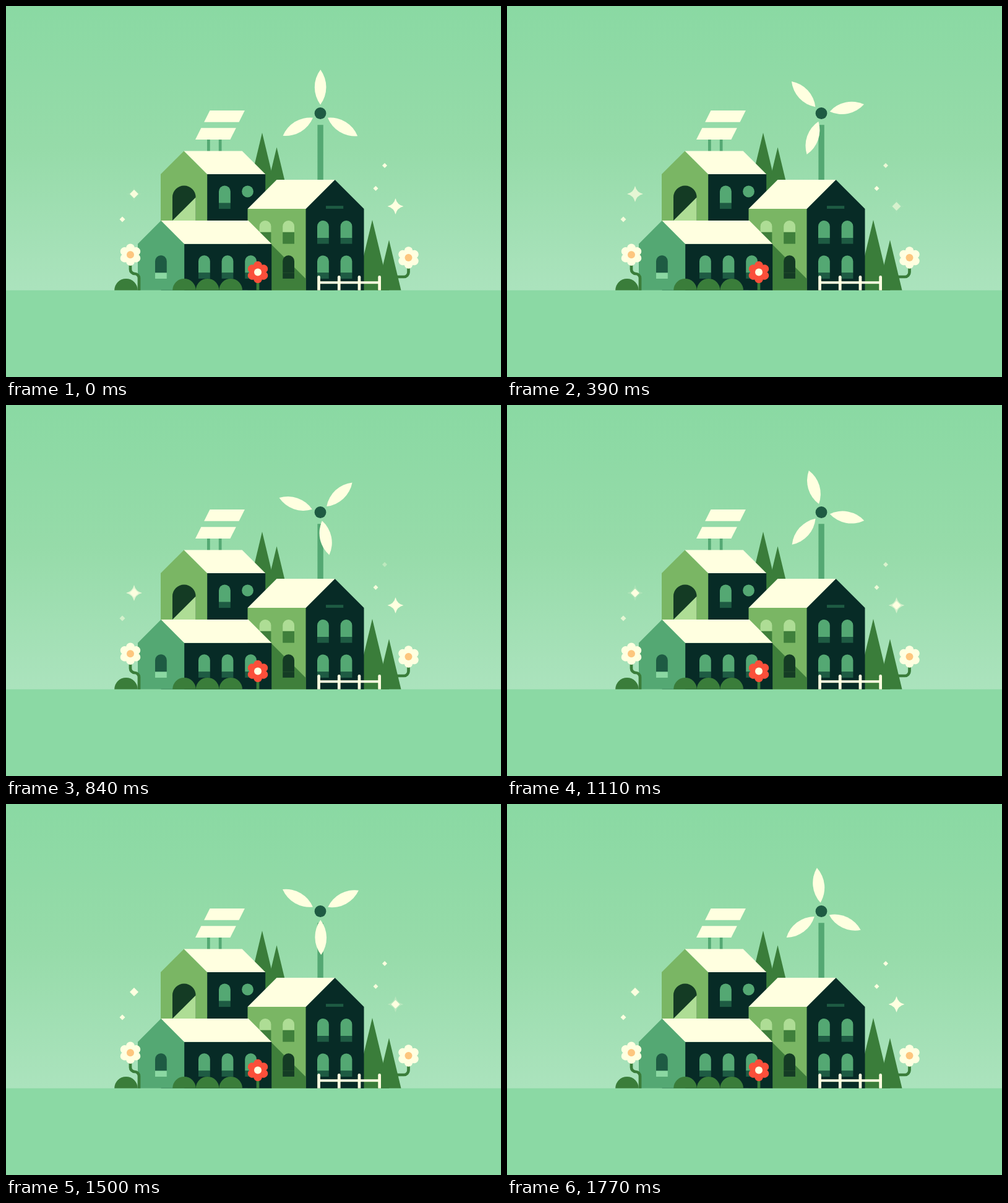
Write an HTML page that moves like this. It is 800x600 px and loops after 1800 ms.

```html
<!DOCTYPE html>
<html lang="en">
<head>
<meta charset="utf-8">
<title>Green village</title>
<style>
html, body { margin: 0; height: 100%; overflow: hidden; background: #8bd9a4 }
svg { display: block; width: 100%; height: 100% }
</style>
</head>
<body>
<svg id="stage" viewBox="0 0 800 600"></svg>
<script>
const LOOP = 1800, GROUND = 459.7;
const U = 4.7; // grid unit of the drawing
const cream = '#ffffe0', night = '#072b26', pine = '#1e5b43', mint = '#54a873', leaf = '#3a7d3a',
  lime = '#7ab664', pale = '#aedd95', moss = '#3f7f3b', cave = '#143b24';

const stage = document.getElementById('stage');
const repeat = (n, make) => Array.from({ length: n }, (_, i) => make(i)).join('');
const shape = (fill, d) => `<path fill="${fill}" d="${d}"/>`;
const box = (fill, x, y, w, h) => shape(fill, `M${x} ${y}h${w}v${h}h${-w}z`);
const line = (color, width, d) => `<path fill="none" stroke="${color}" stroke-width="${width}" d="${d}"/>`;
const dot = (fill, x, y, r) => `<circle fill="${fill}" cx="${x}" cy="${y}" r="${r}"/>`;

// Starts at the outer gable corner; negative sizes build to the left
const house = (x, eave, half, length, base, gable, wall) => {
  const peak = x + half, inner = peak + half, top = eave - Math.abs(half);
  return box(wall, peak, eave, half + length, base - eave) +
    shape(gable, `M${x} ${base}V${eave}L${peak} ${top}L${inner} ${eave}V${base}z`) +
    shape(cream, `M${peak} ${top}h${length}L${inner + length} ${eave}H${inner}z`);
};

// Arched window of 4 by 8 units with a separate lower pane
const arch = (x, y, top = mint, low = pine, glass = 6 * U) =>
  shape(top, `M${x} ${y + glass}V${y + 2 * U}a${2 * U} ${2 * U} 0 0 1 ${4 * U} 0V${y + glass}z`) +
  box(low, x, y + glass, 4 * U, 8 * U - glass);
const arches = (n, x, y, ...look) => repeat(n, i => arch(x + i * 8 * U, y, ...look));

const tree = (x, top, base) => {
  const half = .24 * (base - top);
  return shape(leaf, `M${x} ${top}l${half} ${base - top}h${-2 * half}z`);
};
const bush = x => shape(leaf, `M${x - 4 * U} ${GROUND}a${4 * U} ${4 * U} 0 0 1 ${8 * U} 0z`);
const flower = (x, y, petal, heart) =>
  `<g transform="translate(${x} ${y})">` + dot(petal, 0, 0, 10) +
  repeat(6, i => `<g transform="rotate(${i * 60})">${dot(petal, 0, -10.8, 6.9)}</g>`) +
  dot(heart, 0, 0, 6) + '</g>';

const sky = `
  <linearGradient id="sky" x2="0" y2="1">
    <stop stop-color="#8ad9a3"/><stop offset=".5" stop-color="#96dba9"/><stop offset="1" stop-color="#abe3bd"/>
  </linearGradient>` +
  box('url(#sky)', 0, 0, 800, 460) + box('#8bd9a4', 0, GROUND, 800, 141);

// The two lower blades sit slightly more than a third of a turn from the upper one
const blade = angle => `<g transform="rotate(${angle})">` +
  shape(cream, 'M0-70.5A47.5 47.5 0 0 1 0-14A47.5 47.5 0 0 1 0-70.5z') + '</g>';
const turbine = box(mint, 503.4, 192.2, 2 * U, 92) +
  `<g transform="translate(508 173.5)"><g id="rotor">${[0, 121.2, 238.8].map(blade).join('')}</g>` +
  dot(pine, 0, 0, 2 * U) + '</g>';

const panels = repeat(2, i =>
  box(mint, 325 + i * 4 * U, 215, U, 22) +
  shape(cream, `M${329.5 - i * 3 * U} ${169 + i * 6 * U}h${12 * U}l${-2 * U} ${4 * U}h${-12 * U}z`));

const upperHouse = house(250, 272, 8 * U, 20 * U, 350, lime, night) +
  shape(cave, `M269 350V309.3a${4 * U} ${4 * U} 0 0 1 ${8 * U} 0V350z`) +
  shape(pale, 'M306.6 309.5V347.1H269z') +
  arch(344, 290.5) + dot(mint, 390.5, 300, 2 * U);

const rightHouse = house(578.5, 328, -10 * U, -20 * U, GROUND, night, lime) +
  shape(moss, `M428 384.7l56.5 56.5V${GROUND}H428z`) +
  arches(2, 409.6, 347, pale, moss, 4 * U) + arch(447.2, 403.3, cave, cave) +
  repeat(2, i => arches(2, 503, 347 + i * 12 * U)) +
  box(pine, 517, 323.2, 6 * U, U);

const frontHouse = house(213, 384.7, 8 * U, 30 * U, GROUND, mint, night) +
  arch(241, 403.3, pine, '#8bd8a2') + arches(3, 311, 403.3);

const stems = line(leaf, U, `M201 418v8a7 7 0 0 0 7 7a7 7 0 0 1 7 7V${GROUND}M407 445V${GROUND}M630 438h13a7.5 7.5 0 0 0 7.5-7.5v-8`);
const fence = line(cream, 4, 'M505.5 447.3h98') +
  repeat(4, i => shape(cream, `M${503.2 + i * 32.7} ${GROUND}V438.3a2.35 2.35 0 0 1 ${U} 0V${GROUND}z`));
const garden = bush(194) + repeat(3, i => bush(288 + i * 8 * U)) + stems +
  flower(201, 402.3, cream, '#fdc67e') + flower(650.5, 407, cream, '#fdc67e') +
  flower(407, 430.5, '#fb4f3a', cream) + fence;

// Sparkles: a pulse has the given peak, beats per loop and sharpness
const pulse = (p, peak, beats, sharp) => Math.cos(Math.PI * beats * (p - peak)) ** (2 * sharp);
const diamond = r => `M0-${r}L${r} 0L0 ${r}L-${r} 0z`;
const star = 'M0-13Q2.5-2.5 13 0Q2.5 2.5 0 13Q-2.5 2.5-13 0Q-2.5-2.5 0-13z';
const dim = (peak, depth, sharp) => p => 1 - depth * pulse(p, peak, 1, sharp);
const sparkles = [
  [207, 304, diamond(7), dim(.25, 1, 4)],
  [207, 304, star, p => pulse(p, .34, 1, 2)],
  [629.5, 324, diamond(7), dim(.28, .5, 4)],
  [629.5, 324, star, p => pulse(p, 0, 2, 1)],
  [188, 345, diamond(4.5), dim(.46, .45, 2)],
  [612, 258, diamond(4), dim(.45, .65, 2)],
  [597.5, 295, diamond(4), dim(.65, .2, 2)]
];

stage.innerHTML = sky + tree(414, 205, 300) + tree(437.5, 228.5, 300) + turbine + panels + upperHouse +
  tree(592, 346, GROUND) + tree(619, 378.5, GROUND) + rightHouse + frontHouse + garden +
  sparkles.map(([x, y, d]) => `<g class="spark" transform="translate(${x} ${y})">${shape(cream, d)}</g>`).join('');

const rotor = document.getElementById('rotor');
const sparks = stage.querySelectorAll('.spark');

function draw(time) {
  const p = time % LOOP / LOOP;
  rotor.setAttribute('transform', `rotate(${360 * p})`);
  sparkles.forEach(([, , , glow], i) => sparks[i].setAttribute('opacity', glow(p)));
}

const start = performance.now();
function tick() {
  draw(performance.now() - start);
  requestAnimationFrame(tick);
}
tick();
</script>
</body>
</html>
```
